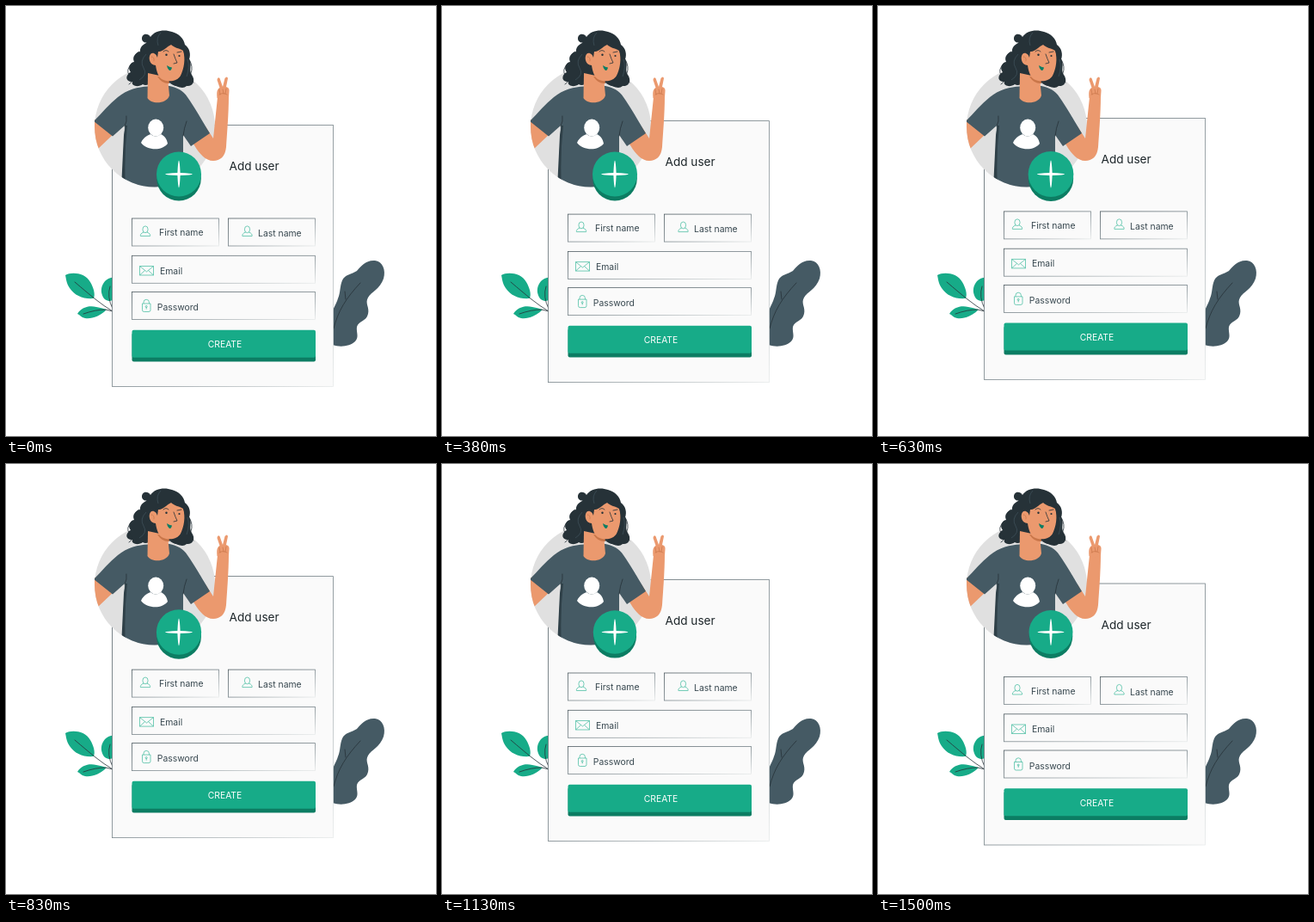
An HTML page that plays this animation: 500 px wide and 500 px high, repeating every 1540 ms.

```html
<!DOCTYPE html>
<html lang="en">
<head>
<meta charset="utf-8">
<style>
html, body { margin: 0; width: 100%; height: 100%; overflow: hidden; background: #fff }
svg { display: block; width: 100vw; height: 100vh }
text { font: 10.4px Inter, "Open Sans", sans-serif; fill: #37474f }
.green { fill: #17ab88 }
.shade { fill: #0c7d63 }
.slate { fill: #455a64 }
.dark { fill: #263238 }
.skin { fill: #eb996e }
.line { fill: none; stroke: #263238; stroke-width: .8; stroke-linecap: round }
.icon { fill: none; stroke: #3bb99b; stroke-width: .7 }
.fold { fill: none; stroke: #c97649; stroke-width: .7; stroke-linecap: round }
.frame { fill: #fafafa; stroke: url(#fade); stroke-width: .8 }
</style>
</head>
<body>
<svg viewBox="0 0 500 500">
<defs>
  <linearGradient id="fade" x2="1" y2="1">
    <stop stop-color="#4f5c62"/><stop offset=".5" stop-color="#78848a"/><stop offset="1" stop-color="#e8ebeb"/>
  </linearGradient>
  <clipPath id="bust">
    <circle cx="173" cy="140.5" r="70"/>
    <path d="M103 0H300V185H218V140H103Z"/>
  </clipPath>
  <g id="user" class="icon">
    <ellipse cy="-2.2" rx="3.1" ry="3.9"/>
    <path d="M-1.800 1C-5 2-6 4-5.600 5.500H5.600C6 4 5 2 1.800 1"/>
  </g>
</defs>

<g id="leaves">
  <path class="green" d="M69 313C76 309 92 310 98 321C102 328 104 335 102 340C90 341 80 337 74 328C70 322 70 317 69 313Z"/>
  <path class="green" d="M127 315.500C115 315 109 326 111.500 335C113 341 117 343 121 343L127 341Z"/>
  <path class="green" d="M83 358C88 350 97 348 105 350Q111 351 117 353C109 361 100 364 92 363C87 362 86 359 83 358Z"/>
  <path class="line" d="M80 321Q94 333 104 341T124 355M121 326Q117 338 124 352M90 358Q104 353 116 353L124 355"/>
  <path class="slate" d="M380 394C388 397 400 396 406 390C411 385 407 379 408 373C410 366 419 367 421 358C423 350 417 346 421 339C425 332 435 329 439 317C442 307 438 297 429 296C419 295 412 303 408 308C402 312 394 312 391 319C388 326 389 333 386 340C384 347 381 350 380 355Z"/>
  <path class="line" d="M381 375C386 355 395 340 412 322M395 341L394 332"/>
</g>

<g id="card">
  <rect class="frame" x="123.500" y="138.500" width="257" height="304"/>
  <text x="259.500" y="191" style="font-size:13.6px;fill:#1c2529">Add user</text>
  <g id="fields"></g>
  <use href="#user" x="162" y="262"/>
  <use href="#user" x="280.500" y="262"/>
  <path class="icon" d="M155.500 302.500h16v10.500h-16ZL163.500 309L171.500 302.500M155.500 313L161.500 307.500M171.500 313L165.500 307.500"/>
  <path class="icon" d="M158.500 346h9.500v7.500q0 2-2 2h-5.500q-2 0-2-2ZM160 346v-1.500a3.200 3.200 0 0 1 6.400 0V346M163.200 352.500v-2.500"/>
  <circle class="icon" cx="163.200" cy="349.500" r="1"/>
  <rect class="shade" x="146.500" y="380" width="213.500" height="33.500" rx="2"/>
  <rect class="green" x="146.500" y="376.700" width="213.500" height="32" rx="2"/>
  <text x="254.500" y="397.200" text-anchor="middle" style="font-size:10.3px;fill:#fff">CREATE</text>
</g>

<circle cx="173" cy="140.500" r="70" fill="#e0e0e0"/>
<g id="person" clip-path="url(#bust)">
  <path class="skin" d="M100 130L126 148L106 167L98 160Z"/>
  <path class="skin" d="M246 106L259 104C259 125 257 148 256 164C255 175 249 180 241 180C232 180 225 172 219 162L210 150L232 140L241 154Z"/>
  <path class="skin" d="M245.500 107C245 101 245 97 248.500 95L245.500 86Q246 82 248.500 84L252 94L254.500 84Q257 81 258 84L256 94Q260 95 259.500 99L259 106Q252 111 245.500 107Z"/>
  <path class="fold" d="M248 97L249 103M252 97L253 102M256 96L255 102M248 103Q252 100 257 103"/>
  <path class="slate" d="M165 93.500C154 94 141 97 130 106C120 114 111 125 102 134L124 151.500L138 139L135 212H206L206 150L215 163L237 148C229 135 219 117 211 106C206 98 199 95 190 93Z"/>
  <path d="M139 139L137 150L134 212H139Q137 175 141 139Z" fill="#2f4048"/>
  <path class="line" d="M210 134Q207 142 206 151M138 140Q141 134 140 128"/>
  <path class="dark" d="M169 41C165 44 158 43 158 38C158 32 165 31 168 36C173 28 185 27 193 30C201 32 207 38 208 45C214 49 215 57 213 62C217 68 212 74 216 80C221 87 217 94 210 93C206 97 198 94 194 90L170 87C167 92 162 93 159 91C154 95 145 93 147 88C138 88 139 80 145 77C141 72 144 66 149 65C146 59 151 54 156 53C155 47 162 42 169 41Z"/>
  <path class="line" d="M147 66Q138 75 144 81T143 91M213 62Q218 71 215 78T218 89M155 53Q148 56 151 61"/>
  <path class="skin" d="M165 78L188 83L190 104C187 114 169 115 164.500 107Z"/>
  <path d="M176 82Q182 91 190 90L189 84Z" fill="#c97649"/>
  <path class="skin" d="M177 53C182 54 187 47 192 45C196 49 202 49 206 52C209 61 207 73 203 81C199 88 188 89 181 85C177 82 175 76 174 69C167 69 165 60 168 56C171 53 175 56 176 60Z"/>
  <path class="dark" d="M204 48C211 58 208 76 203 82C198 88 194 87 191 90Q198 95 206 93L213 83L210 54Z"/>
  <path class="line" d="M183 53Q186 50 189 53M199 54L204 53M195 56Q197 62 199 66L195 67"/>
  <circle class="dark" cx="186.500" cy="56.800" r="1.200"/>
  <circle class="dark" cx="201.500" cy="58" r="1.100"/>
  <path class="shade" d="M187 69Q190 71 193 71.500Q192 76 189.500 74.500Q187.500 73 187 69Z"/>
  <path class="fold" d="M169 59Q173 59 172 64"/>
  <path d="M180 31Q174 37 177 46M163 56Q155 64 160 72T155 86M211 62Q214 71 210 82" fill="none" stroke="#455a64" stroke-width=".6"/>
  <ellipse cx="174.200" cy="141.500" rx="9" ry="10" fill="#fff"/>
  <path d="M157 159C160 152 166 150 168 149Q174 154 180 149C184 151 187 154 188 160C181 169 164 168 157 159Z" fill="#fff"/>
</g>

<g id="plus">
  <circle class="shade" cy="5.200" r="25.800"/>
  <circle class="green" r="26"/>
  <path d="M-16 0Q-15-1-1.600-1.500Q-1-15 0-16Q1-15 1.600-1.500Q15-1 16 0Q15 1 1.600 1.500Q1 15 0 16Q-1 15-1.600 1.500Q-15 1-16 0Z" fill="#fff"/>
</g>
</svg>

<script>
const LOOP = 1540, FPS = 24;
const lift = [[0, 0], [5, -2.5], [9, -4.9], [13, -7.4], [15, -8.1], [17.5, -8.8], [20, -7.9], [27, -4], [36, .5]];
const pulse = [[0, 1], [5, 1.04], [9, 1], [15, 1.015], [20, 1.005], [27, .97], [36, .98]];
const byId = id => document.getElementById(id);

function field(x, y, width, label, textX, baseline) {
  return `<rect class="frame" x="${x}" y="${y}" width="${width}" height="32"/>
    <text x="${textX}" y="${baseline}">${label}</text>`;
}

function valueAt(keys, step) {
  const next = Math.max(1, keys.findIndex(key => key[0] >= step));
  const [a, from] = keys[next - 1], [b, to] = keys[next];
  return from + (to - from) * (step - a) / (b - a);
}

function draw() {
  const time = performance.now() % LOOP;
  const step = Math.min(36, Math.floor(time * FPS / 1000 + .13));
  byId('card').setAttribute('transform', `translate(0 ${valueAt(lift, step)})`);
  byId('plus').setAttribute('transform', `translate(201 195.5) scale(${valueAt(pulse, step)})`);
  requestAnimationFrame(draw);
}

byId('fields').innerHTML =
  field(146.5, 247, 101, 'First name', 178, 267) +
  field(258.5, 247, 101, 'Last name', 293, 268) +
  field(146.5, 290.3, 213, 'Email', 179, 311.5) +
  field(146.5, 332.5, 213, 'Password', 175.8, 354);
draw();
</script>
</body>
</html>
```
